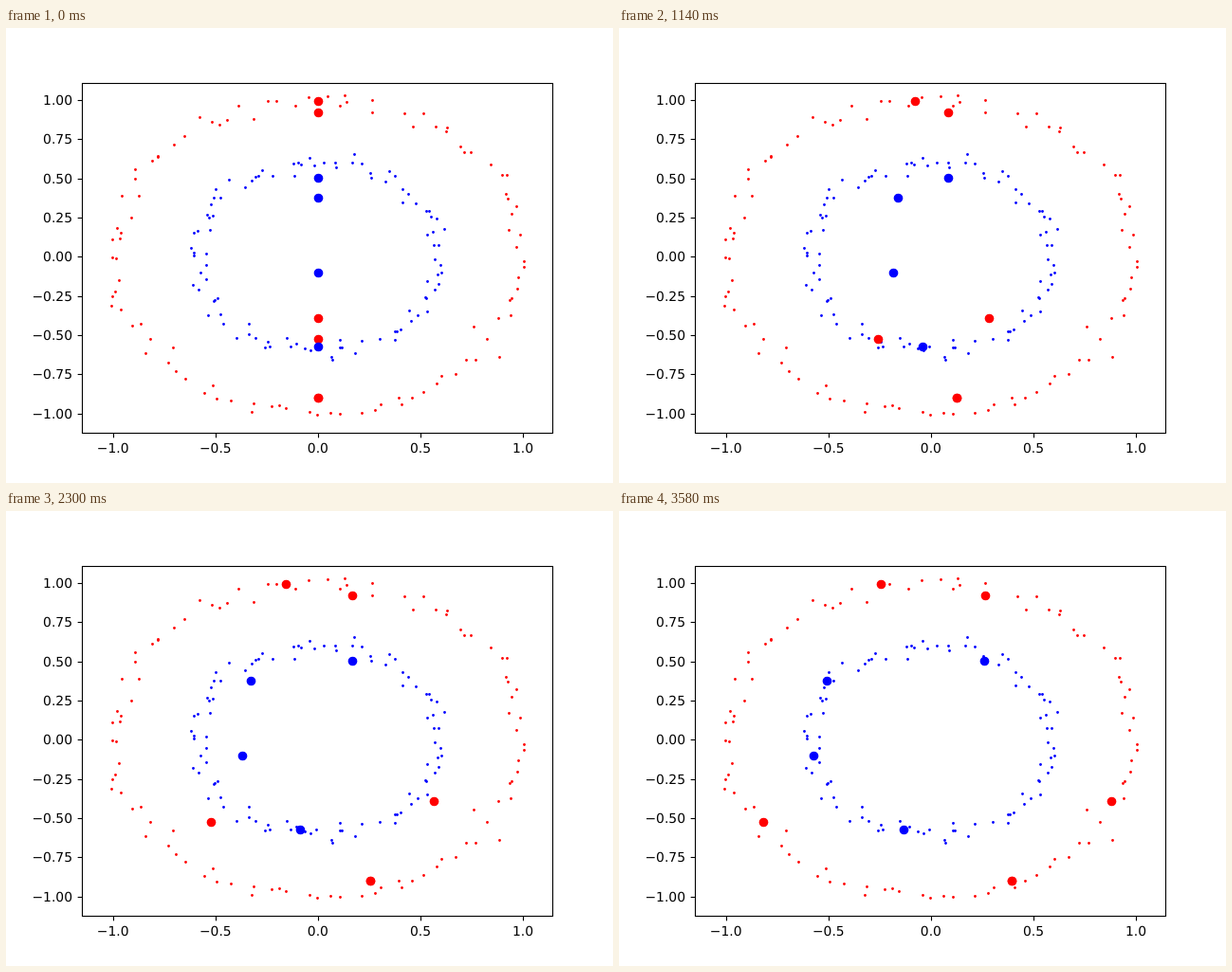
An HTML page for the animation above (3.6 s loop, 640 px wide and 480 px high).

```html
<!DOCTYPE html>
<html lang="en">
<head>
<meta charset="utf-8">
<title>Two rings</title>
<style>
  html, body { margin: 0; width: 100%; height: 100%; overflow: hidden; background: #fff; }
  svg { display: block; width: 640px; height: 480px; }
  text { font: 13.89px "DejaVu Sans", sans-serif; text-rendering: geometricPrecision; }
  .axis { fill: none; stroke: #000; stroke-width: 1.11; }
  .red { fill: #f00; }
  .blue { fill: #00f; }
</style>
</head>
<body>
<svg viewBox="0 0 640 480">
  <rect class="axis" x="80.5" y="58.5" width="496" height="369"/>
</svg>
<script>
const svg = document.querySelector('svg');
const CX = 328.9, CY = 241.3, UX = 216.2, UY = 165.5;
const LOOP = 3600, STEP = 20, LAST = LOOP / STEP - 1;
const COUNT = 100, NOISE = .03, TAU = 2 * Math.PI;

// Where the large dots end; one sample was drawn twice.
const ends = {
  red: [[276, 77], [385.6, 89], [519.3, 306], [152.4, 328], [414, 390], [414, 390]],
  blue: [[385, 158], [219, 179], [205, 258], [300, 336]]
};

const toX = v => CX + UX * v;
const toY = v => CY - UY * v;
const snap = v => Math.round(v) + .5;

function add(tag, attrs, text) {
  const el = document.createElementNS('http://www.w3.org/2000/svg', tag);
  for (const k in attrs) el.setAttribute(k, attrs[k]);
  if (text) el.textContent = text;
  svg.append(el);
  return el;
}

const dot = (x, y, r, cls) => add('circle', { cx: snap(x), cy: snap(y), r, class: cls });
const label = (v, digits) => v.toFixed(digits).replace('-', '\u2212');

function drawAxes() {
  for (let v = -1; v <= 1; v += .5) {
    add('path', { class: 'axis', d: `M${snap(toX(v))} 427.5v4.86` });
    add('text', { x: toX(v), y: 448, 'text-anchor': 'middle' }, label(v, 1));
  }
  for (let v = -1; v <= 1; v += .25) {
    const y = Math.round(toY(v));
    add('path', { class: 'axis', d: `M80.5 ${y + .5}h-4.86` });
    add('text', { x: 70, y: y + 5, 'text-anchor': 'end' }, label(v, 2));
  }
}

let seed = 7;
function random() {
  seed = (seed + 0x6D2B79F5) | 0;
  let t = Math.imul(seed ^ seed >>> 15, 1 | seed);
  t = t + Math.imul(t ^ t >>> 7, 61 | t) ^ t;
  return ((t ^ t >>> 14) >>> 0) / 2 ** 32;
}
const gauss = () =>
  Math.sqrt(-2 * Math.log(1 - random())) * Math.cos(TAU * random());

// Evenly spaced samples of a circle, each shifted by normal noise.
function drawRing(cls, size) {
  const points = Array.from({ length: COUNT }, (_, i) => {
    const a = TAU * i / COUNT;
    return [
      toX(size * Math.cos(a) + NOISE * gauss()),
      toY(size * Math.sin(a) + NOISE * gauss())
    ];
  });
  // The end points are samples too and take the slot nearest in angle.
  for (const [x, y] of ends[cls]) {
    const turn = Math.atan2((CY - y) / UY, (x - CX) / UX) / TAU;
    points[Math.round((turn + 1) * COUNT) % COUNT] = [x, y];
  }
  for (const [x, y] of points) dot(x, y, 1.39, cls);
}

drawAxes();
drawRing('red', 1);
drawRing('blue', .6);

const movers = Object.entries(ends).flatMap(([cls, list]) =>
  list.map(([x, y]) => ({ el: dot(CX, y, 4.86, cls), dx: x - CX })));

function draw() {
  const p = Math.floor(performance.now() % LOOP / STEP) / LAST;
  for (const { el, dx } of movers) el.setAttribute('cx', snap(CX + dx * p));
  requestAnimationFrame(draw);
}
draw();
</script>
</body>
</html>
```
